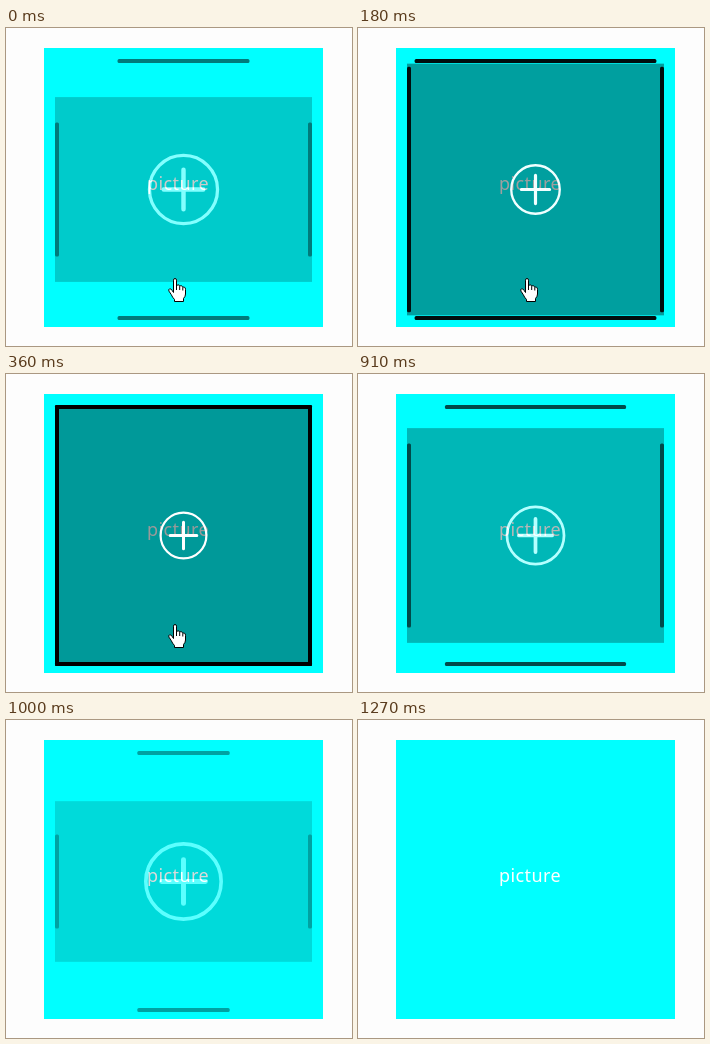
Recreate the animation shown at these times as an HTML page. Size 346 px wide and 318 px high, loop 1.82 s.

```html
<!DOCTYPE html>
<html lang="en">
<head>
<meta charset="utf-8">
<title>Picture hover</title>
<style>
  html, body { margin: 0; width: 100%; height: 100%; overflow: hidden; background: #fdfdfd; }
  svg { display: block; }
  text { font: 18px "Noto Sans", "Open Sans", sans-serif; letter-spacing: .4px; fill: #fff; }
</style>
</head>
<body>
<svg width="346" height="318">
  <rect x="38" y="20" width="279" height="279" fill="#0ff"/>
  <text x="141" y="162">picture</text>
  <g id="hover" transform="translate(177.5 161.5)">
    <rect id="shade" x="-128.5" width="257" fill-opacity=".4"/>
    <rect class="across" y="-130.5" height="4" rx="1.5"/>
    <rect class="across" y="126.5" height="4" rx="1.5"/>
    <rect class="down" x="-128.5" width="4" rx="1.5"/>
    <rect class="down" x="124.5" width="4" rx="1.5"/>
    <g id="icon" fill="none" stroke="#fff" stroke-linecap="round">
      <circle r="22.9" stroke-width="2.2"/>
      <path d="M-13.3 0H13.3M0-13.3V13.3" stroke-width="3"/>
    </g>
  </g>
  <g id="hand" fill="#fff" stroke="#000" stroke-linejoin="round">
    <path d="M167.5 264.5V252.2Q167.5 250.5 169 250.5T170.5 252.2V258Q171 256.8 172.2 256.8T173.7 258.3Q174.2 257.5 175.3 257.7T176.8 259.5Q177.5 258.7 178.5 259.2T179.5 261.5V266Q179.5 268.5 177.5 270.5V273.5H168.5V271.5Q166.5 269.5 165.2 266.5L163 263.2Q162.2 261.5 163.5 260.9T166 262.3Z"/>
    <path d="M170.5 258v4M173.7 258.3v3.7M176.8 259.5v3" fill="none"/>
  </g>
</svg>
<script>
const LOOP = 1820, LEAVE = 820, STEP = 90;
const $ = id => document.getElementById(id);

// Sampled positions along the enter and leave transitions
const enter = [.3, .5, .7, .9, 1];
const leave = [0, .2, .372, .58, .79, 1];
const iconLeave = [0, .178, .375, .58, .79, 1];

// CSS "ease": cubic-bezier(.25, .1, .25, 1)
function ease(x) {
  const bezier = (a, b, s) => 3 * a * s * (1 - s) ** 2 + 3 * b * s * s * (1 - s) + s ** 3;
  let lo = 0, hi = 1;
  for (let i = 0; i < 24; i++) {
    const mid = (lo + hi) / 2;
    if (bezier(.25, .25, mid) < x) lo = mid; else hi = mid;
  }
  return x >= 1 ? 1 : x <= 0 ? 0 : bezier(.1, 1, lo);
}

const sample = (list, ms) => ease(list[Math.min(Math.floor(ms / STEP), list.length - 1)]);

// Size an element symmetrically about the centre
function span(el, pos, size, length) {
  el.setAttribute(pos, -length / 2);
  el.setAttribute(size, length);
}

function draw(now) {
  const t = now % LOOP, inside = t < LEAVE;
  const p = inside ? sample(enter, t) : 1 - sample(leave, t - LEAVE);
  const q = inside ? p : 1 - sample(iconLeave, t - LEAVE);
  $("hover").setAttribute("opacity", p);
  span($("shade"), "y", "height", 261 * (.4 + .6 * p));
  document.querySelectorAll(".across").forEach(el => span(el, "x", "width", 257 * p));
  document.querySelectorAll(".down").forEach(el => span(el, "y", "height", 261 * p));
  $("icon").setAttribute("transform", `scale(${2 - q})`);
  $("hand").setAttribute("visibility", inside ? "visible" : "hidden");
}

const start = performance.now();
function tick() {
  draw(performance.now() - start);
  requestAnimationFrame(tick);
}
tick();
</script>
</body>
</html>
```
